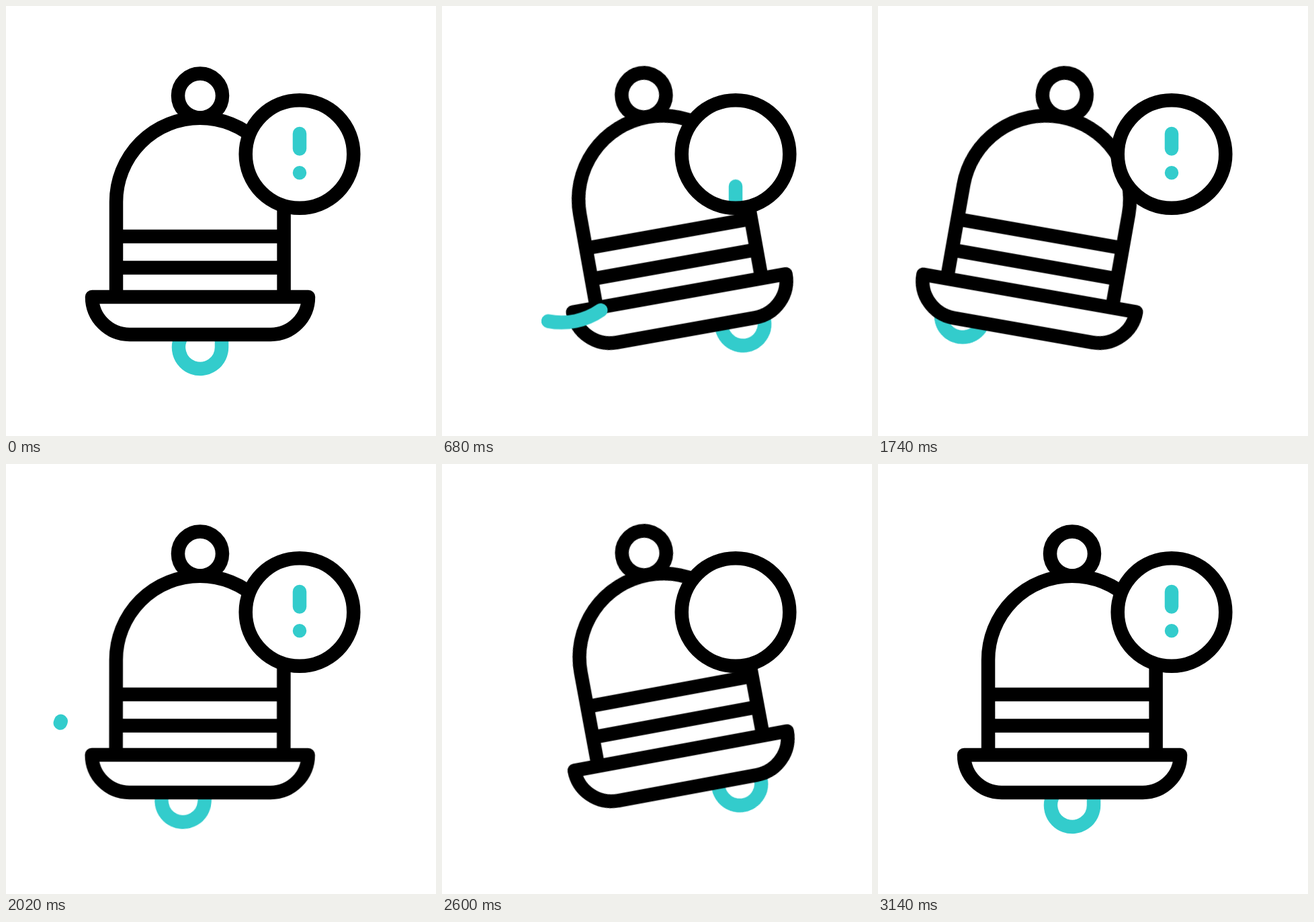
Recreate the animation shown at these times as an HTML page. Size 640 px wide and 640 px high, loop 3.2 s.

```html
<!DOCTYPE html>
<html lang="en">
<head>
<meta charset="utf-8">
<title>Bell alert</title>
<style>
  @property --head { syntax: "<number>"; inherits: false; initial-value: 0; }
  @property --tail { syntax: "<number>"; inherits: false; initial-value: 0; }

  html, body { margin: 0; width: 100%; height: 100%; overflow: hidden; background: #fff; }
  svg { display: block; width: 100vw; height: 100vh; }

  .ink, .teal { fill: none; stroke: #000; stroke-width: 20.5; stroke-linejoin: round; }
  .teal { stroke: #33cccc; stroke-linecap: round; }
  .solid { fill: #fff; }

  .bell, .clapper, .mark, .swoosh {
    animation: 3200ms cubic-bezier(.333, 0, .667, 1) infinite;
  }
  .bell { transform-origin: 289px 69px; animation-name: swing; }
  .clapper { transform-origin: 289px 218px; animation-name: knock; }
  .mark { animation-name: drop; }
  .swoosh {
    opacity: 0;
    stroke-dasharray: calc((var(--head) - var(--tail)) * 1px) 9px;
    stroke-dashoffset: calc(var(--tail) * -1px);
    animation-name: head, tail, show;
    animation-delay: var(--at);
  }

  @keyframes swing {
    0%, 5% { transform: rotate(0deg); }
    23.28%, 32.375% { transform: rotate(-10.5deg); }
    44.25%, 52.44% { transform: rotate(10.5deg); }
    73.94%, 81.25% { transform: rotate(-10.5deg); }
    98.44%, 100% { transform: rotate(0deg); }
  }
  @keyframes knock {
    0%, 5% { transform: translateY(0) rotate(0deg); }
    23.28%, 32.56% { transform: translateY(0) rotate(-17.7deg); }
    44.44%, 54.38% { transform: translateY(-9.5px) rotate(18.6deg); }
    75.47%, 77.19% { transform: translateY(0) rotate(-17.7deg); }
    95.63%, 100% { transform: translateY(0) rotate(0deg); }
  }
  /* leaves through the bottom, comes back from the top */
  @keyframes drop {
    0%, 15.625% { transform: translateY(0); }
    25% { transform: translateY(120px); }
    25.01%, 40.6% { transform: translateY(-120px); }
    50%, 68.1% { transform: translateY(0); }
    77.5% { transform: translateY(120px); }
    77.51%, 90.3% { transform: translateY(-120px); }
    97.8%, 100% { transform: translateY(0); }
  }
  @keyframes head {
    0% { --head: 0; }
    7.19%, 100% { --head: 1; }
  }
  @keyframes tail {
    0%, 2.22% { --tail: 0; }
    9.41%, 100% { --tail: 1; }
  }
  @keyframes show {
    0%, 9.4% { opacity: 1; }
    9.41%, 100% { opacity: 0; }
  }
</style>
</head>
<body>
<svg viewBox="0 0 640 640">
  <defs>
    <clipPath id="face"><circle cx="437" cy="220.5" r="72"/></clipPath>
  </defs>

  <g class="bell">
    <path class="teal clapper" d="M264.5 487.4A32 32 0 1 0 321 508V490"/>
    <circle class="ink" cx="289" cy="133.5" r="33"/>
    <path class="ink solid" d="M164 433V291.5A124.8 124.8 0 0 1 413.6 291.5V433"/>
    <path class="ink" d="M164 343H413.6M164 389.5H413.6"/>
    <path class="ink solid" d="M128 433H450A56 56 0 0 1 394 489H184A56 56 0 0 1 128 433Z"/>
  </g>

  <circle class="solid" cx="437" cy="220.5" r="80"/>
  <g clip-path="url(#face)">
    <path class="teal mark" d="M437 190V212.5M437 248.3V248.31"/>
  </g>
  <circle class="ink" cx="437" cy="220.5" r="80.3"/>

  <g id="swooshes"></g>
</svg>
<script>
  // centre x, centre y, mirror, start time in ms
  const swooshes = [
    [178, 368.5, 1, 468],
    [440.5, 399, -1, 1133],
    [178, 418, 1, 2007],
    [440.5, 450, -1, 2687]
  ];
  document.getElementById("swooshes").innerHTML = swooshes.map(([x, y, flip, at]) =>
    `<g transform="translate(${x} ${y}) scale(${flip} 1)">
      <path class="teal swoosh" pathLength="1" style="--at:${at}ms"
        d="M-96.3 -35.1A102.5 102.5 0 0 0 61.7 81.9"/>
    </g>`).join("");
</script>
</body>
</html>
```
